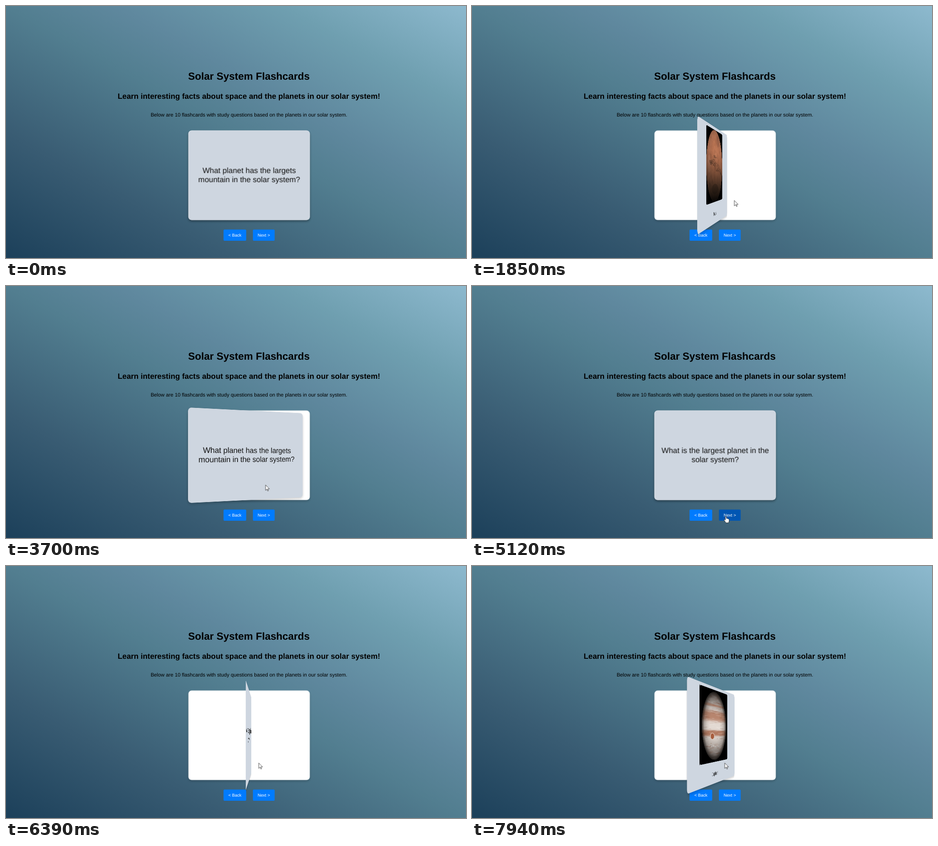
Recreate the animation shown at these times as an HTML page with a canvas. Size 1011 by 554 pixels, loop 8 s.

```html
<!DOCTYPE html>
<html lang="en">
<head>
<meta charset="utf-8">
<title>Solar System Flashcards</title>
<style>
  html, body { margin: 0; width: 100%; height: 100%; overflow: hidden; }
  #stage {
    position: relative; width: 100%; height: 100%; overflow: hidden; contain: strict;
    background: linear-gradient(to top right, rgb(28,64,90), rgb(57,92,115) 25%,
      rgb(82,126,144) 50%, rgb(95,136,158) 62%, rgb(111,159,176) 80%, rgb(141,185,206));
  }
  #page {
    position: absolute; left: 0; top: 0; width: 1440px; height: 789px;
    transform: scale(.70208); transform-origin: 0 0; text-rendering: geometricPrecision;
    font: 16px/18px "Liberation Sans", Arial, sans-serif; color: #000;
  }
  h1, h2, p { position: absolute; left: 81px; right: 0; margin: 0; text-align: center; white-space: nowrap; }
  h1 { top: 202px; font-size: 32px; line-height: 36px; }
  h2 { top: 268.5px; font-size: 24px; line-height: 28px; }
  p { top: 332.5px; }
  .button {
    position: absolute; top: 700px; padding: 10px 15px; border-radius: 3px;
    font-size: 13.333px; line-height: 15px; color: #fff; background: #007bff; white-space: nowrap;
  }
  #card { position: absolute; left: 571.3px; top: 390.4px; width: 380px; height: 280px; perspective: 1000px; }
  #base, .face { position: absolute; border-radius: 10px; box-shadow: 0 4px 8px rgba(0,0,0,.2); }
  #base { inset: 0; background: #fff; }
  .face { background: rgb(206,214,224); }
  #front {
    inset: 0; display: flex; align-items: center; justify-content: center;
    text-align: center; font-size: 24px; line-height: 28px; color: #111; white-space: pre;
  }
  #back { inset: -10px; }
  .planet { position: absolute; left: 50%; top: 9px; transform: translateX(-50%); height: 224px; }
  #answer { position: absolute; left: 0; right: 0; top: 262px; text-align: center; color: #111; }
  #spot, #pointer { position: absolute; left: 0; top: 0; }
  #spot { width: 24px; height: 24px; margin: -12px; border-radius: 50%; background: rgba(255,245,0,.55); }
  #pointer { overflow: visible; }
  #pointer path { fill: #fff; stroke: #000; stroke-width: 1; stroke-linejoin: round; }
</style>
</head>
<body>
<div id="stage"><div id="page">
  <h1>Solar System Flashcards</h1>
  <h2>Learn interesting facts about space and the planets in our solar system!</h2>
  <p>Below are 10 flashcards with study questions based on the planets in our solar system.</p>
  <div class="button" style="left:681px">&lt; Back</div>
  <div class="button" id="next" style="left:772.5px">Next &gt;</div>
  <div id="card">
    <div id="base"></div>
    <div id="front" class="face"></div>
    <div id="back" class="face">
      <canvas id="mars" class="planet" width="448" height="448"></canvas>
      <canvas id="jupiter" class="planet" width="480" height="448"></canvas>
      <div id="answer"></div>
    </div>
  </div>
  <div id="spot"></div>
  <svg id="pointer" width="20" height="24">
    <path id="arrow" d="M0 0V17L4 13.2 6.6 19 9 18 6.4 12.4H12z"/>
    <path id="hand" transform="translate(-6.6 -.4)" d="M5 13V2a1.6 1.6 0 0 1 3.2 0V8q2-2 3 .5 2-1 3 1 2-.5 2.5 1.5V15q0 3-2 6.5H6.5Q5 18 1 13c-.6-1.3 1-2.6 2.2-1.6z"/>
  </svg>
</div></div>
<script>
const $ = id => document.getElementById(id);
const SCALE = 1011 / 1440, LOOP = 8000;
const clamp = (v, a = 0, b = 1) => Math.min(b, Math.max(a, v));
const mix = (a, b, k) => a + (b - a) * k;
const mixColor = (a, b, k) => a.map((v, i) => mix(v, b[i], k));
const smooth = k => k * k * (3 - 2 * k);
const show = (id, on) => { $(id).style.display = on ? '' : 'none'; };

// ---- planets ----
function randomizer(seed) {
  return () => (seed = (seed * 16807) % 2147483647) / 2147483647;
}

function ellipse(c, x, y, rx, ry, color, turn = 0) {
  c.fillStyle = color;
  c.beginPath();
  c.ellipse(x, y, rx, ry, turn, 0, 7);
  c.fill();
}

// Evenly spaced stops over the whole picture.
function wash(c, gradient, colors) {
  colors.forEach((color, i) => gradient.addColorStop(i / (colors.length - 1), color));
  c.fillStyle = gradient;
  c.fillRect(0, 0, 240, 224);
}

// Black rounded picture with a disc that clips whatever paint() draws.
function drawPlanet(id, radius, paint) {
  const c = $(id).getContext('2d'), width = $(id).width / 2;
  c.scale(2, 2);
  c.fillRect(0, 0, 1.2, 224);
  c.beginPath();
  c.roundRect(0, 0, width, 224, 10);
  c.fill();
  c.clip();
  c.beginPath();
  c.arc(width / 2, 112, radius, 0, 7);
  c.clip();
  paint(c, randomizer(41));
}

drawPlanet('mars', 111.5, (c, rnd) => {
  wash(c, c.createRadialGradient(125, 70, 10, 112, 112, 114),
    ['rgb(188,119,86)', 'rgb(180,112,80)', 'rgb(170,108,79)', 'rgb(142,92,69)']);
  for (let i = 0; i < 400; i++) {
    const size = 1 + rnd() * 8;
    ellipse(c, rnd() * 224, rnd() * 224, size * 1.5, size * .8,
      rnd() < .5 ? 'rgba(222,155,120,.07)' : 'rgba(80,46,32,.07)', rnd() * 3);
  }
  ellipse(c, 150, 32, 24, 17, 'rgba(100,66,54,.25)', .3);
  ellipse(c, 35, 108, 18, 26, 'rgba(205,160,135,.2)');
  // canyon system: dark flecks along a wavy line sinking to the right
  for (let i = 0; i < 240; i++) {
    const k = rnd(), spread = (rnd() - .5) * mix(6, 26, k * (1 - k) * 4);
    ellipse(c, mix(40, 208, k), 100 + 38 * k * k + 4 * Math.sin(k * 14) + spread,
      1 + rnd() * 5, .5 + rnd() * 1.2, 'rgba(45,32,28,.28)', .2 + rnd() * .4);
  }
  for (let i = 0; i < 30; i++)
    ellipse(c, 94 + rnd() * 44, 79 + rnd() * 8, 1 + rnd() * 4, 1, 'rgba(45,32,28,.35)', .2);
  ellipse(c, 112, 184, 44, 16, 'rgba(30,26,22,.3)');
  wash(c, c.createLinearGradient(112, 70, 106, 224),
    ['rgba(14,12,8,0)', 'rgba(14,12,8,.18)', 'rgba(14,12,8,.46)', 'rgba(14,12,8,.75)', 'rgb(6,5,4)']);
});

drawPlanet('jupiter', 105.5, (c, rnd) => {
  const belt = (y, center, width) => Math.exp(-(((y - center) / width) ** 4));
  for (let y = 0; y < 224; y++) {
    const rust = .55 * belt(y, 48, 4) + .75 * belt(y, 81, 16) + .85 * belt(y, 134, 9);
    const pole = clamp(Math.abs(y - 112) / 105) ** 2;
    const color = mixColor(mixColor([226, 217, 210], [116, 107, 102], pole), [172, 108, 80], rust);
    c.fillStyle = `rgb(${color})`;
    c.fillRect(0, y, 240, 1.5);
  }
  for (let i = 0; i < 300; i++)
    ellipse(c, rnd() * 240, rnd() * 224, 5 + rnd() * 22, .5 + rnd() * 1.4,
      rnd() < .5 ? 'rgba(240,230,222,.2)' : 'rgba(130,72,48,.2)', (rnd() - .5) * .12);
  ellipse(c, 97, 144, 20, 11, 'rgba(222,200,186,.7)');
  ellipse(c, 97, 144, 14, 8.5, '#a85c3c');
  for (let i = 0; i < 7; i++) ellipse(c, 70 + i * 17, 173 + i % 2 * 3, 3, 2, 'rgba(238,230,224,.7)');
  wash(c, c.createRadialGradient(118, 110, 45, 120, 112, 106),
    ['rgba(20,14,10,0)', 'rgba(20,14,10,.08)', 'rgba(20,14,10,.25)', 'rgba(10,8,6,.85)']);
});

// ---- timeline ----
const FLIP_CLICKS = [[1360, 1526], [3070, 3240], [5980, 6096], [7600, 7682]];
const NEXT_CLICK = [4660, 4790];
const HOVER = [3940, 5215];
const ENTRY = { start: 460, x: 860, y: 546 };
const MOVES = [
  { start: 460, end: 1160, x: 576.5, y: 427.5 },
  { start: 2460, end: 2670, x: 571.5, y: 432 },
  { start: 3630, end: 4060, x: 558, y: 506 },
  { start: 5110, end: 5500, x: 555.5, y: 433 },
];

// cubic-bezier(.42, 0, .58, 1)
function easeInOut(x) {
  let low = 0, high = 1, s = .5;
  for (let i = 0; i < 24; i++) {
    s = (low + high) / 2;
    const at = 3 * (1 - s) ** 2 * s * .42 + 3 * (1 - s) * s * s * .58 + s ** 3;
    if (at < x) low = s; else high = s;
  }
  return smooth(s);
}

// Every click turns the card the other way.
const flipAngle = t => FLIP_CLICKS.reduce((angle, [, up], i) =>
  angle + (i % 2 ? -180 : 180) * easeInOut(clamp((t - up) / 600)), 0);

function pointerAt(t) {
  return MOVES.reduce((from, move) => {
    const k = smooth(clamp((t - move.start) / (move.end - move.start)));
    return { x: mix(from.x, move.x, k), y: mix(from.y, move.y, k) };
  }, ENTRY);
}

function renderCard(t) {
  const second = t >= NEXT_CLICK[1], angle = flipAngle(t);
  $('front').textContent = second
    ? 'What is the largest planet in the\nsolar system?'
    : 'What planet has the largets\nmountain in the solar system?';
  $('answer').textContent = second ? 'Jupiter!' : 'Mars!';
  show('mars', !second);
  show('jupiter', second);
  show('front', angle < 90);
  show('back', angle >= 90);
  $('front').style.transform = `rotateY(${angle}deg)`;
  $('back').style.transform = `rotateY(${180 - angle}deg)`;
}

function renderPointer(t) {
  const { x, y } = pointerAt(t);
  const over = t >= HOVER[0] && t < HOVER[1];
  const visible = t >= ENTRY.start;
  show('pointer', visible);
  show('arrow', !over);
  show('hand', over);
  show('spot', [...FLIP_CLICKS, NEXT_CLICK].some(([down, up]) => t >= down && t < up));
  $('pointer').style.transform = $('spot').style.transform = `translate(${x / SCALE}px,${y / SCALE}px)`;

  const glow = clamp((t - HOVER[0]) / 300) - clamp((t - HOVER[1]) / 300);
  $('next').style.background = `rgb(${mixColor([0, 123, 255], [0, 86, 179], glow)})`;
}

const begin = performance.now();
function tick() {
  const t = (performance.now() - begin) % LOOP;
  renderCard(t);
  renderPointer(t);
  requestAnimationFrame(tick);
}
tick();
</script>
</body>
</html>
```
